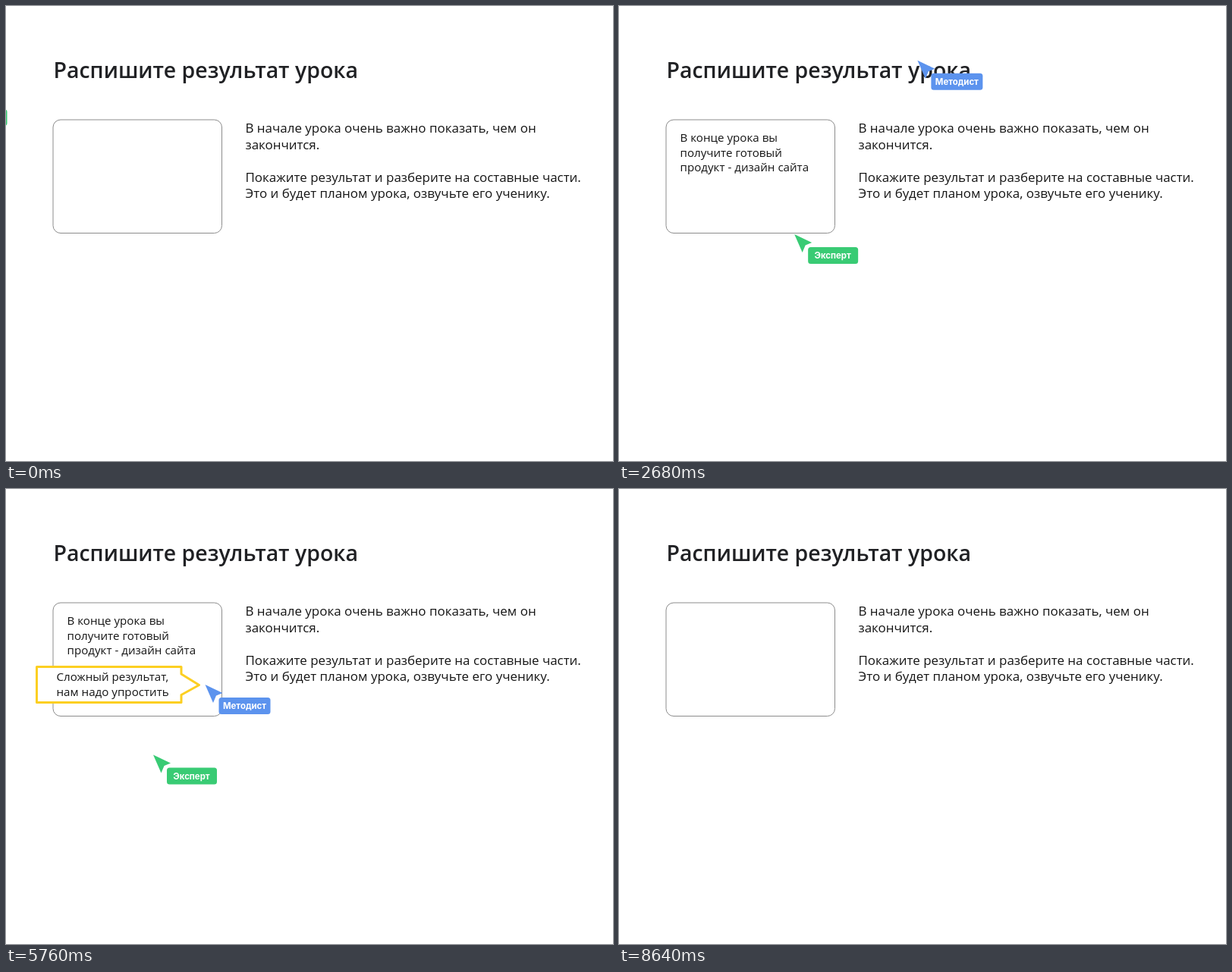
Recreate the animation shown at these times as an HTML page. Size 800x600 px, loop 8680 ms.

```html
<!DOCTYPE html>
<html lang="ru">
<head>
<meta charset="utf-8">
<style>
  html, body { margin: 0; width: 100%; height: 100%; overflow: hidden; background: #fff; }
  svg { display: block; width: 800px; height: 600px; }
  text { font-family: "Open Sans", "Noto Sans", sans-serif; fill: #151515; }
  .title { font-size: 28.45px; font-weight: 600; fill: #202124; }
  .body { font-size: 16.95px; }
  .note { font-size: 15.15px; }
  .tag { font: 700 11.4px Inter, sans-serif; fill: #fff; text-anchor: middle; }
  .yellow { fill: #fff; stroke: #fccf22; stroke-linejoin: round; }
</style>
</head>
<body>
<svg viewBox="0 0 800 600">
  <text class="title" x="62.5" y="95">Распишите результат урока</text>
  <g class="body">
    <text x="315.5" y="167">В начале урока очень важно показать, чем он</text>
    <text x="315.5" y="188.5">закончится.</text>
    <text x="315.5" y="231.5">Покажите результат и разберите на составные части.</text>
    <text x="315.5" y="253">Это и будет планом урока, озвучьте его ученику.</text>
  </g>
  <rect x="62" y="150" width="222.5" height="149.5" rx="10" fill="none" stroke="#8c8c8c"/>
  <g class="note" id="goal">
    <text x="80.5" y="179">В конце урока вы</text>
    <text x="80.5" y="198.5">получите готовый</text>
    <text x="80.5" y="218">продукт - дизайн сайта</text>
  </g>
  <g id="icon" class="yellow" stroke-width="2.2">
    <path d="M223 244H256.5V270H239L230 276.5V270H223Z"/>
    <path d="M231 252H239M241 252H243M231 256.5H248M231 261H243" stroke-width="1.6"/>
  </g>
  <g id="callout">
    <path class="yellow" stroke-width="3" d="M40.5 234.5H231V244L254.5 258.5L231 271.5V281.5H40.5Z"/>
    <g class="note">
      <text x="66.5" y="253">Сложный результат,</text>
      <text x="66.5" y="272.5">нам надо упростить</text>
    </g>
  </g>
  <g id="expert" fill="#39cb74">
    <path d="M0 0L23 11L14.5 14.5L10.5 24Z"/>
    <rect x="18" y="17" width="66" height="22" rx="3.5"/>
    <text class="tag" x="50.5" y="32">Эксперт</text>
  </g>
  <g id="methodist" fill="#5c93ee">
    <path d="M0 0L23 11L14.5 14.5L10.5 24Z"/>
    <rect x="18" y="17" width="68" height="22" rx="3.5"/>
    <text class="tag" x="52" y="32">Методист</text>
  </g>
</svg>
<script>
  const LOOP = 8680;
  const [goal, icon, callout, expert, methodist] =
    ["goal", "icon", "callout", "expert", "methodist"].map(id => document.getElementById(id));

  const ramp = (t, start, end) => Math.min(1, Math.max(0, (t - start) / (end - start)));
  const ease = p => (1 - Math.cos(Math.PI * p)) / 2;
  const visible = (t, inStart, inEnd, outStart, outEnd) =>
    ramp(t, inStart, inEnd) - ramp(t, outStart, outEnd);
  const mix = (a, b, p) => a.map((v, i) => v + (b[i] - v) * p);
  const fade = (el, opacity) => el.setAttribute("opacity", opacity);
  const place = (el, pos) => el.setAttribute("transform", `translate(${pos})`);

  function draw(t) {
    const entered = mix([-82.5, 119], [245.5, 282], ease(ramp(t, 0, 880)));
    place(expert, mix(entered, [194, 350.5], ease(ramp(t, 2320, 3340))));
    place(methodist, mix([472, -40], [262.5, 258], ease(ramp(t, 2320, 3180))));
    for (const cursor of [expert, methodist]) fade(cursor, 1 - ramp(t, 7200, 7900));

    // The icon and the callout cross-fade into each other.
    const expanded = visible(t, 4800, 5600, 6280, 6760);
    fade(callout, expanded);
    fade(icon, visible(t, 3760, 4160, 7200, 7700) * (1 - expanded));
    fade(goal, visible(t, 900, 1200, 8440, 8640));
  }

  function frame() {
    draw(performance.now() % LOOP);
    requestAnimationFrame(frame);
  }
  frame();
</script>
</body>
</html>
```
